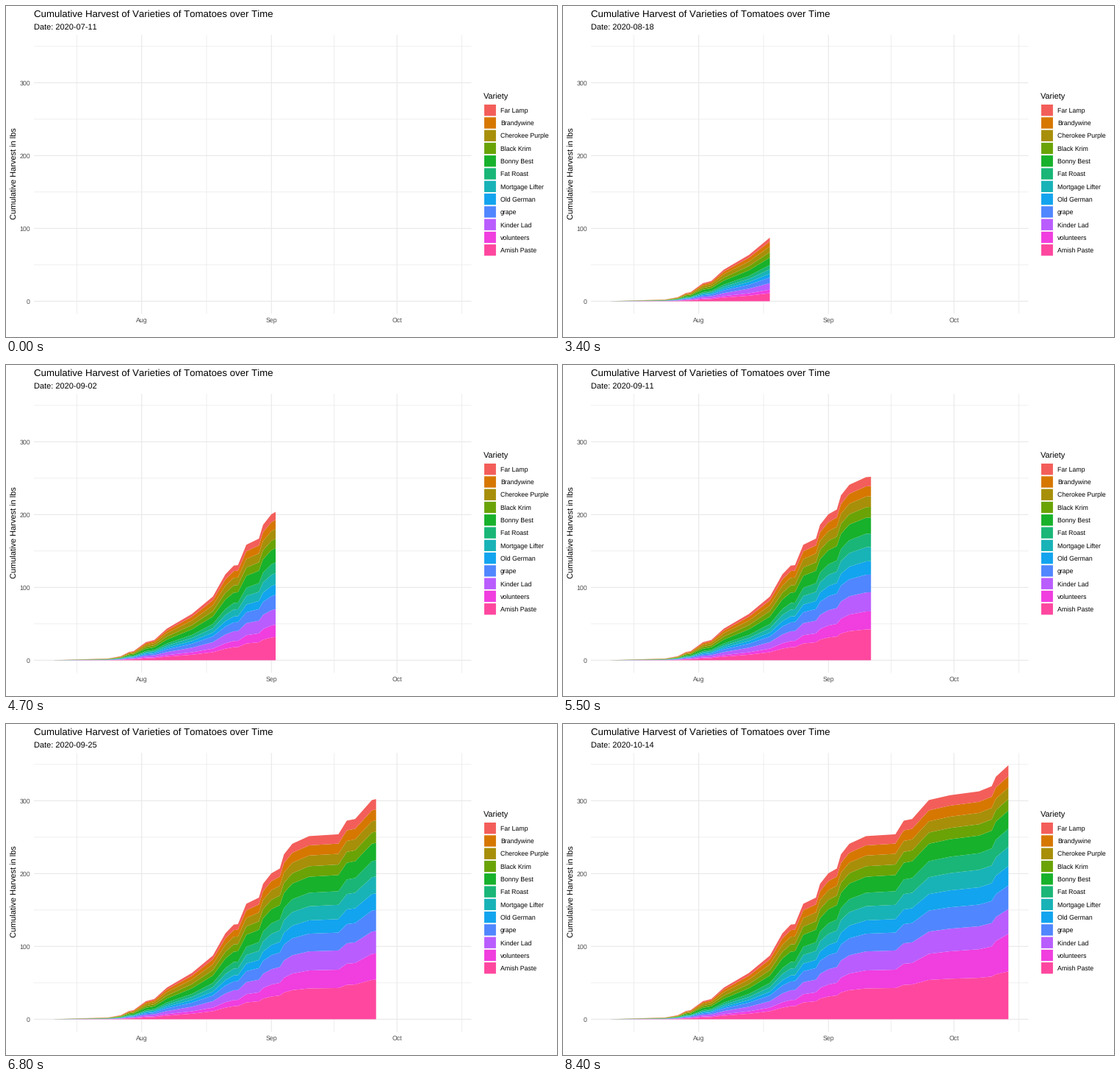
Animation of 750x450 px, one loop 10 s. Source, as a matplotlib script:

```python
import matplotlib.pyplot as plt
import numpy as np
from matplotlib.animation import FuncAnimation
from matplotlib.patches import Polygon, Rectangle

plt.rcParams.update({
    "font.family": "Liberation Sans",
    "text.hinting": "none",
    "text.kerning_factor": 6,  # plain advance widths, no pair kerning
})

WIDTH, HEIGHT, DPI = 750, 450, 100
FRAMES, LAST_STEP, LAST_DAY = 100, 84, 95
START = np.datetime64("2020-07-11")
GRID, GREY = "#E8E8E8", "#4D4D4D"

# Bends of the total curve: day since START, cumulative lbs.
DAYS, LBS = np.transpose([
    (0, 0.1), (13, 2.4), (16, 5.6), (18, 11.5), (19, 12.3), (22, 24.8),
    (24, 27.8), (27, 43.4), (33, 63.6), (38, 87.4), (41, 118), (43, 130),
    (44, 130.6), (46, 158.6), (49, 167), (50, 186), (52, 200.5), (54, 207),
    (55, 226.5), (57, 241), (61, 251.5), (68, 254), (70, 272.7), (72, 275),
    (76, 301), (81, 307.6), (88, 313), (91, 320), (92, 333), (95, 348.8),
])

# Name, colour, final lbs, earliness (above 1 ripens ahead of the total).
VARIETIES = [
    ("Far Lamp", "#F35E5A", 15.0, 1.7),
    ("Brandywine", "#D67700", 15.6, 2.4),
    ("Cherokee Purple", "#A78F09", 15.7, 3.4),
    ("Black Krim", "#6AA306", 15.8, 2.8),
    ("Bonny Best", "#17B12B", 24.9, 2.2),
    ("Fat Roast", "#19B677", 25.0, 0.95),
    ("Mortgage Lifter", "#18B3B7", 26.3, 0.95),
    ("Old German", "#12A4EE", 26.7, 0.75),
    ("grape", "#5086FF", 32.4, 1.0),
    ("Kinder Lad", "#B95DFF", 34.0, 1.1),
    ("volunteers", "#F03EDF", 51.6, 0.33),
    ("Amish Paste", "#FF479F", 65.7, 0.63),
]


def x_of(day):
    return 65.06 + 5.697 * day


def y_of(lbs):
    return 401.4 - 0.99 * lbs


def stack_edges():
    """Layer boundaries at each bend, from the baseline up to the total."""
    done = LBS / LBS[-1]
    layers = np.array([
        final * early * done / (1 - done + early * done)
        for _, _, final, early in reversed(VARIETIES)
    ])
    layers *= LBS / layers.sum(axis=0)
    return np.vstack([np.zeros_like(LBS), np.cumsum(layers, axis=0)])


EDGES = stack_edges()
# When several bends share a step, the latest one is shown.
STEP_DAYS = dict(zip(np.round(DAYS * LAST_STEP / LAST_DAY), DAYS))

fig = plt.figure(figsize=(WIDTH / DPI, HEIGHT / DPI), dpi=DPI, facecolor="white")
ax = fig.add_axes([0, 0, 1, 1])
ax.set(xlim=(0, WIDTH), ylim=(HEIGHT, 0))
ax.axis("off")


def label(x, y, text, px, color="black", **kwargs):
    kwargs.setdefault("va", "baseline")
    return ax.text(x, y, text, fontsize=px * 72 / DPI, color=color, **kwargs)


def grid_line(xs, ys, px):
    ax.plot(xs, ys, color=GRID, lw=px * 72 / DPI, snap=False,
            solid_capstyle="butt", zorder=1)


def draw_grid():
    left, right, top, bottom = 38, 633.5, 39.3, 418.5
    for lbs in range(0, 351, 50):
        grid_line([left, right], [y_of(lbs)] * 2, 0.7 if lbs % 100 else 1.07)
    for day in (5.5, 36.5, 67, 97.5):
        grid_line([x_of(day)] * 2, [top, bottom], 0.7)
    for day, month in ((21, "Aug"), (52, "Sep"), (82, "Oct")):
        grid_line([x_of(day)] * 2, [top, bottom], 1.07)
        label(x_of(day), 430, month, 8.8, GREY, ha="center")
    for lbs in range(0, 301, 100):
        label(33, y_of(lbs) + 3.2, str(lbs), 8.8, GREY, ha="right")


def draw_legend():
    label(650, 127, "Variety", 11)
    for i, (name, color, *_) in enumerate(VARIETIES):
        y = 133.2 + 17.28 * i
        ax.add_patch(Rectangle((651, y + 0.8), 15.9, 15.4, fc=color, lw=0, snap=False))
        label(673, y + 11.8, name, 8.8)


draw_grid()
draw_legend()
label(38, 15, "Cumulative Harvest of Varieties of Tomatoes over Time", 13.2)
date_text = label(38, 32, "", 11)
label(13, 229, "Cumulative Harvest in lbs", 11, rotation=90, ha="right", va="center",
      rotation_mode="default").set_horizontalalignment("center")
ax.texts[-1].set_x(11.7)
ax.texts[-1].set_y(228)

areas = [
    ax.add_patch(Polygon([(0, 0)] * 3, fc=color, lw=0, zorder=2, snap=False))
    for _, color, *_ in reversed(VARIETIES)
]


def update(frame):
    step = min(frame, LAST_STEP)
    date_text.set_text(f"Date: {START + LAST_DAY * step // LAST_STEP}")

    edge_day = np.interp(step, list(STEP_DAYS), list(STEP_DAYS.values()))
    days = np.append(DAYS[DAYS < edge_day], edge_day)
    xs = x_of(days)
    ys = [y_of(np.interp(days, DAYS, edge)) for edge in EDGES]
    for area, low, high in zip(areas, ys, ys[1:]):
        area.set_visible(step > 0)
        area.set_xy(np.column_stack([np.r_[xs, xs[::-1]], np.r_[high, low[::-1]]]))
    return [date_text, *areas]


anim = FuncAnimation(fig, update, frames=FRAMES, interval=100, repeat=True,
                     repeat_delay=0, blit=False)
plt.show()
```
